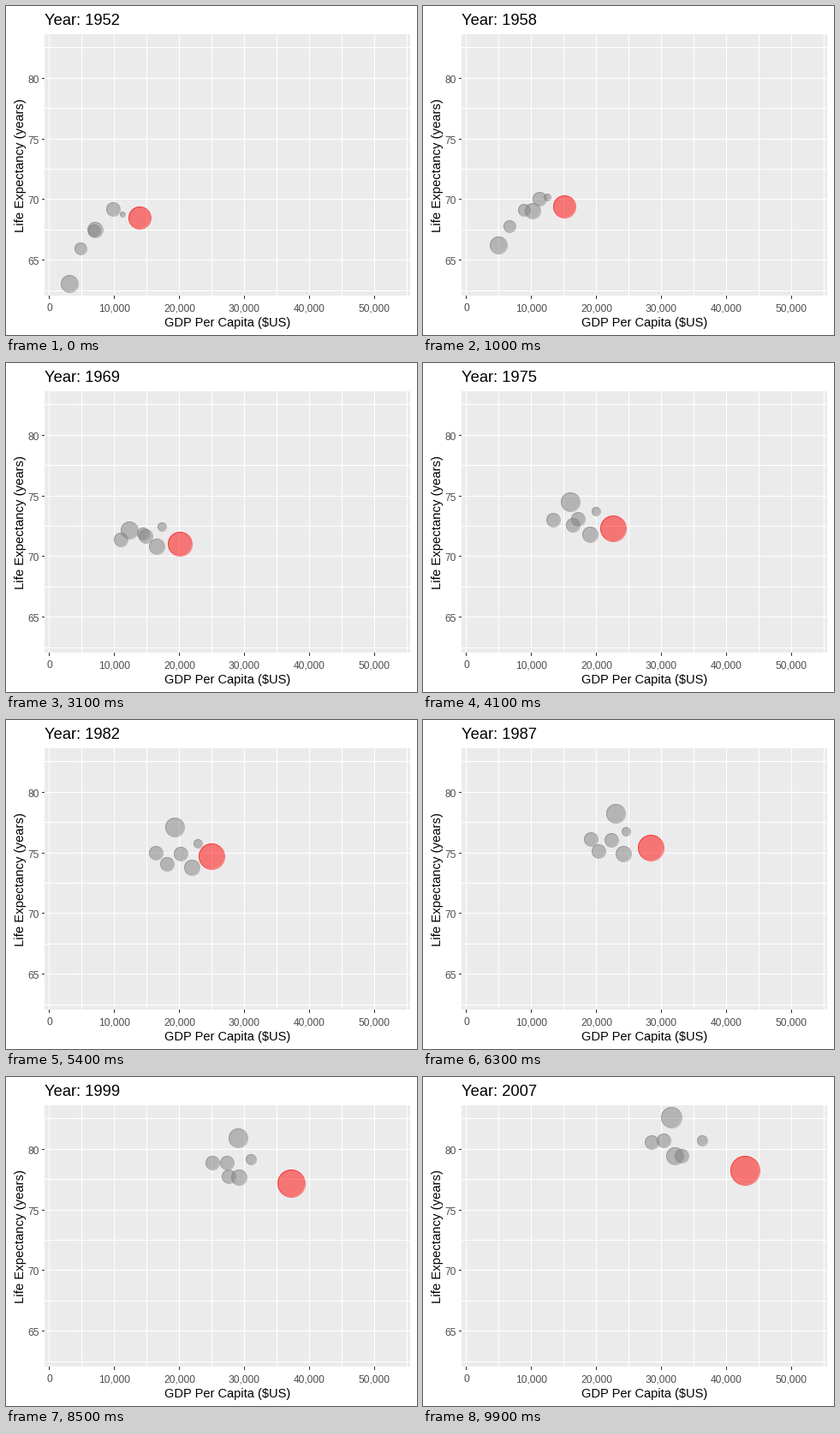
Recreate the animation shown at these times as a matplotlib script. Size 480 by 384 pixels, loop 10 s.

```python
import math

import matplotlib.pyplot as plt
import numpy as np
from matplotlib.animation import FuncAnimation
from matplotlib.patches import Circle, Rectangle

W, H, DPI = 480, 384, 96
FRAMES, INTERVAL = 100, 100
FIRST, LAST = 1952, 2007
LEFT, TOP, RIGHT, BOTTOM = 45, 33, 472, 338
GREY, RED = "#7f7f7f", "#ff0000"

plt.rcParams["font.family"] = "Liberation Sans"

# Each bubble moves straight between a few key points:
# GDP (thousands), life expectancy, population (millions, first and last year).
GDP_YEARS = [1952, 1962, 1972, 1982, 1992, 2007]
LIFE_YEARS = [1952, 1962, 1972, 1982, 2007]
BUBBLES = [
    ([11.37, 13.46, 18.97, 22.9, 26.34, 36.32], [68.75, 71.3, 72.88, 75.76, 80.65], [14.8, 33.4], GREY),
    ([7.03, 10.56, 16.11, 20.29, 24.7, 30.47], [67.41, 70.51, 72.38, 74.89, 80.66], [42.5, 61.1], GREY),
    ([7.14, 12.9, 18.02, 22.03, 26.51, 32.17], [67.5, 70.3, 71.0, 73.8, 79.41], [69.2, 82.4], GREY),
    ([4.93, 8.24, 12.27, 16.54, 22.01, 28.57], [65.94, 69.24, 72.19, 74.98, 80.55], [47.7, 58.2], GREY),
    ([3.22, 6.58, 14.78, 19.38, 26.82, 31.66], [63.03, 68.73, 73.42, 77.11, 82.6], [86.5, 127.5], GREY),
    ([9.98, 12.48, 15.9, 18.23, 22.71, 33.2], [69.18, 70.76, 72.01, 74.04, 79.43], [50.4, 60.8], GREY),
    ([13.99, 16.17, 21.81, 25.01, 32.0, 42.95], [68.44, 70.21, 71.34, 74.65, 78.24], [157.6, 301.1], RED),
]
POP_MIN, POP_MAX = 14.8, 301.1


def x_px(gdp):
    return 49.97 + gdp * 7.6


def y_px(life):
    return 190.45 + (72.5 - life) * 14.17


def radius(pop):
    share = (pop - POP_MIN) / (POP_MAX - POP_MIN)
    return int(3.1 + 14.22 * math.sqrt(max(0, share)))


fig = plt.figure(figsize=(W / DPI, H / DPI), dpi=DPI, facecolor="white")
ax = fig.add_axes([0, 0, 1, 1])
ax.set_xlim(0, W)
ax.set_ylim(H, 0)
ax.axis("off")


def box(x, y, w, h, color):
    ax.add_patch(Rectangle((x, y), w, h, fc=color, lw=0, aa=False))


def label(x, y, text, size, color="black", **kw):
    return ax.text(x, y, text, fontsize=size, color=color, **kw)


box(LEFT, TOP, RIGHT - LEFT, BOTTOM - TOP, "#ebebeb")
for gdp in range(0, 56, 5):
    x = round(x_px(gdp))
    box(x, TOP, 1, BOTTOM - TOP, "white")
    if gdp % 10 == 0:
        box(x, BOTTOM, 1, 4, "#333333")
        label(x + 0.5, 356, f"{gdp * 1000:,}", 9, "#4d4d4d", ha="center")
for life in np.arange(62.5, 83, 2.5):
    y = int(y_px(life))
    box(LEFT, y, RIGHT - LEFT, 1, "white")
    if life % 5 == 0:
        box(LEFT - 3, y, 3, 1, "#333333")
        label(39, y + 6, f"{life:.0f}", 9, "#4d4d4d", ha="right")

label(258.5, 374, "GDP Per Capita ($US)", 11, ha="center")
label(24, 186, "Life Expectancy (years)", 11.2, ha="right", va="center", rotation=90)
title = label(45, 22, "", 13.8)


def add_bubble(color):
    disc = Circle((0, 0), 1, fc=color, lw=0, alpha=0.5)
    ring = Circle((0, 0), 1, fc="none", ec=color, lw=72 / DPI, alpha=0.5)
    return ax.add_patch(disc), ax.add_patch(ring)


patches = [add_bubble(color) for *_, color in BUBBLES]


def update(i):
    year = FIRST + (LAST - FIRST) * i / (FRAMES - 1)
    title.set_text(f"Year: {round(year)}")
    for (gdp, life, pop, _), (disc, ring) in zip(BUBBLES, patches):
        x = int(x_px(np.interp(year, GDP_YEARS, gdp)))
        y = int(y_px(np.interp(year, LIFE_YEARS, life)))
        disc.radius = ring.radius = radius(np.interp(year, [FIRST, LAST], pop))
        # The fill sits half a pixel up and left of its outline.
        disc.center = x, y
        ring.center = x + 0.5, y + 0.5
    return [title, *(p for pair in patches for p in pair)]


anim = FuncAnimation(fig, update, frames=FRAMES, interval=INTERVAL,
                     repeat=True, repeat_delay=0)
plt.show()
```
